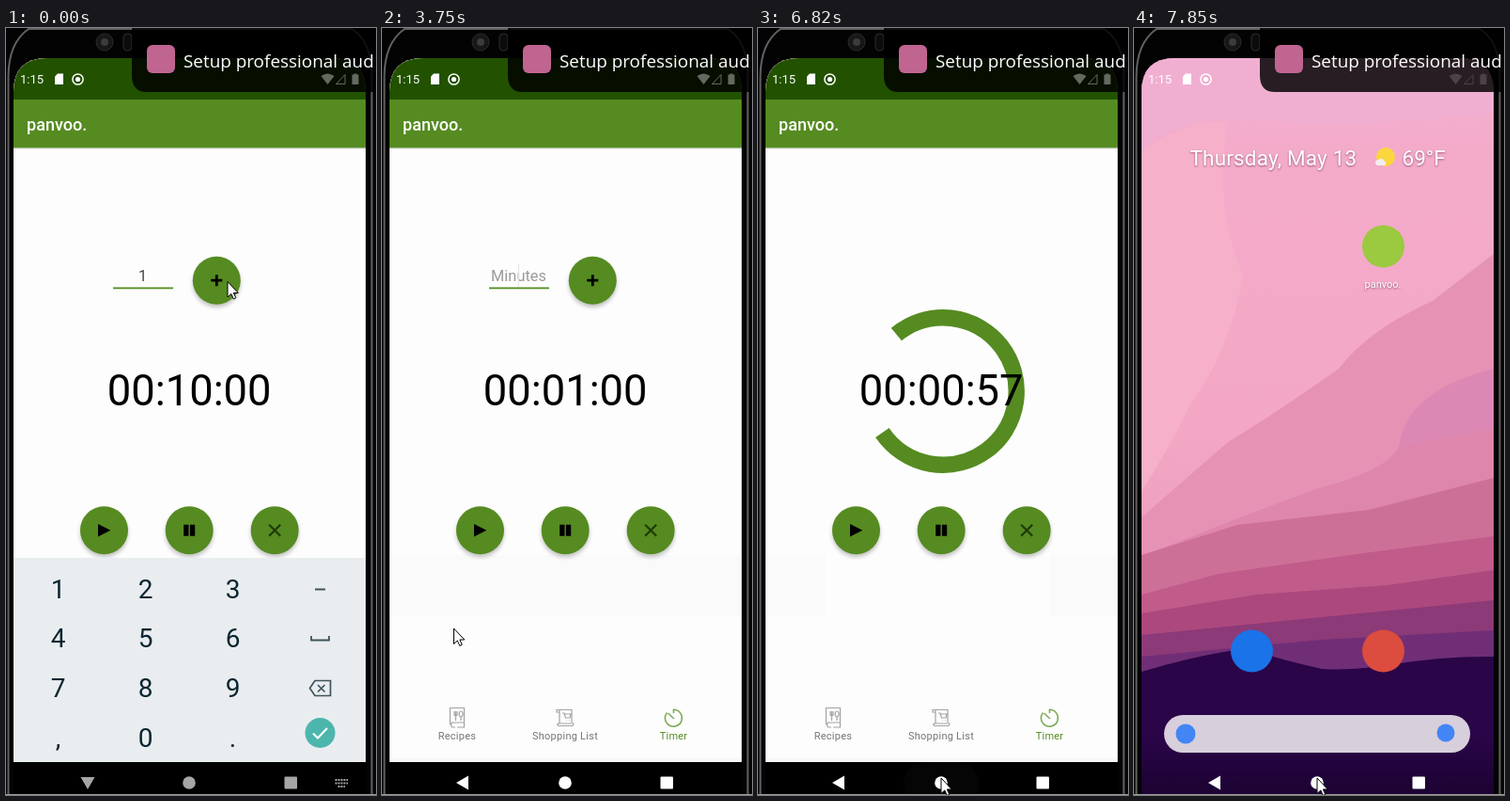
An HTML page for the animation above (8000 ms loop, 394x815 px).

```html
<!DOCTYPE html>
<html lang="en">
<head>
<meta charset="utf-8">
<title>Kitchen timer</title>
<style>
html, body { margin: 0; width: 100%; height: 100%; overflow: hidden; background: #000; }
svg { display: block; width: 394px; height: 815px; font-family: Roboto, sans-serif; }
.mid { text-anchor: middle; }
.fab { filter: drop-shadow(0 3px 2px rgba(0, 0, 0, .24)); }
.fab.down { filter: drop-shadow(0 5px 3px rgba(0, 0, 0, .32)); }
.wash { fill: #fff; opacity: 0; }
.down .wash { opacity: .14; }
.glow { filter: drop-shadow(0 1px 1px rgba(60, 0, 40, .5)); }
.line { fill: none; stroke-width: 1.2; }
</style>
</head>
<body>
<svg viewBox="0 0 394 815">
  <defs>
    <clipPath id="screen"><path d="M8 815V68Q8 32 44 32H347Q383 32 383 68V815Z"/></clipPath>
    <linearGradient id="sky" x1="0" y1="0" x2="0" y2="1">
      <stop offset="0" stop-color="#f0b1d3"/><stop offset=".12" stop-color="#f4abca"/>
      <stop offset=".5" stop-color="#f3a7c4"/><stop offset="1" stop-color="#e592b4"/>
    </linearGradient>
    <linearGradient id="night" x1="0" y1="0" x2="0" y2="1">
      <stop offset=".6" stop-color="#2a0548"/><stop offset="1" stop-color="#1c0232"/>
    </linearGradient>
  </defs>

  <rect width="394" height="815" fill="#030303"/>
  <path d="M2.500 815V52Q2.500 16 24 1H368Q389.500 14 389.500 50V815" fill="none" stroke="#626262" stroke-width="2"/>
  <circle cx="105" cy="15" r="9" fill="#171717" stroke="#2c2c2c"/>
  <circle cx="105" cy="15" r="4" fill="#3b3b3f"/>
  <rect x="125" y="6" width="9" height="18" rx="4" fill="#0c0c0c" stroke="#2c2c2c"/>

  <g clip-path="url(#screen)">
    <g id="home">
      <rect x="8" y="32" width="375" height="783" fill="url(#sky)"/>
      <path d="M8 32H383V90Q230 108 100 96Q40 100 8 130Z" fill="#f0afd1"/>
      <path d="M8 130Q60 96 100 100Q84 190 116 262Q104 340 60 400Q36 450 8 492Z" fill="#f7b0ca"/>
      <path d="M383 240L318 290Q250 320 218 362Q150 410 100 440L8 520V690H383Z" fill="#e692b5"/>
      <path d="M383 362Q290 385 282 445L383 425Z" fill="#db88b4"/>
      <path d="M383 425L282 445Q270 470 200 488Q110 520 8 562V690H383Z" fill="#dd82aa" opacity=".75"/>
      <path d="M383 478L250 512L110 528L8 560V700H383Z" fill="#cd7098"/>
      <path d="M383 540L230 560L90 580L8 602V700H383Z" fill="#c15c8a"/>
      <path d="M383 576L270 592L130 602L8 622V700H383Z" fill="#ad487e"/>
      <path d="M383 608L240 622L8 645V700H383Z" fill="#8c3a78"/>
      <path d="M383 640L200 650L8 668V700H383Z" fill="#702e76"/>
      <path d="M8 684Q55 670 95 663Q108 660 128 662Q160 672 200 681Q235 683 270 677Q330 667 383 668V815H8Z" fill="url(#night)"/>
      <g id="launcher">
        <g class="glow" fill="#fff" font-size="22.5">
          <text x="59.500" y="146" letter-spacing=".18">Thursday, May 13</text>
          <text x="285.500" y="146">69°F</text>
        </g>
        <circle cx="268" cy="137" r="10" fill="#fbd63c"/>
        <path d="M260 146a3 3 0 0 1 .3-6a3.800 3.800 0 0 1 6.500 1.800a2.200 2.200 0 0 1 0 4.200Z" fill="#f1edf0"/>
        <circle cx="265.500" cy="232" r="22.500" fill="#9bc93f"/>
        <text class="mid glow" x="265" y="276" font-size="11" fill="#fff">panvoo.</text>
        <circle cx="125.500" cy="662" r="22.500" fill="#1a73e8"/>
        <circle cx="265.500" cy="662" r="22.500" fill="#dc4c3f"/>
        <rect x="32" y="730" width="326" height="40" rx="20" fill="#d8cfdc"/>
        <circle cx="55" cy="750" r="10.500" fill="#4285f4"/>
        <circle cx="332" cy="749" r="9.500" fill="#4285f4"/>
      </g>
    </g>

    <g id="app">
      <rect x="8" y="32" width="375" height="783" fill="#fdfdfd"/>
      <rect x="8" y="127" width="375" height="1.300" fill="#b4bda8"/>
      <rect x="8" y="32" width="375" height="45" fill="#225100"/>
      <rect x="8" y="76" width="375" height="51" fill="#558b21"/>
      <text x="22" y="109" font-size="18" font-weight="500" fill="#fff">panvoo.</text>
      <g id="shade" fill="#fafafa">
        <rect x="8" y="560" width="64" height="65"/>
        <rect x="311" y="560" width="72" height="65"/>
        <rect id="shadeMid" x="72" y="560" width="239" height="65"/>
      </g>
      <g id="entry">
        <text id="minutes" class="mid" x="145.500" y="269" font-size="16.400"></text>
        <path id="caret" d="M145.500 251V275" stroke="#e2e2e2"/>
        <rect x="114" y="275.500" width="64" height="1.800" fill="#558b21"/>
        <g id="plus"></g>
      </g>
      <path id="ring" fill="none" stroke="#558b21" stroke-width="17.500"/>
      <text id="clock" class="mid" x="195.200" y="400.500" font-size="45.300"></text>
      <g id="play"></g><g id="pause"></g><g id="stop"></g>

      <g font-size="11" letter-spacing=".25" class="mid" fill="#757575">
        <text x="80" y="756">Recipes</text>
        <text x="195" y="756">Shopping List</text>
        <text x="310.500" y="756" fill="#558b21">Timer</text>
      </g>
      <g class="line" stroke="#a3a3a3">
        <path d="M72.500 740V722.500H87.500V738H74.500Q72 741 75 743H78M80 743H87.500V738M77 726V730Q78.500 732 80 730V726M78.500 726V736M84 736V732M84 726a2 3 0 1 0 .1 0"/>
        <path d="M189 739V724.500H186V727H189M189 724.500H202V738M187 739H204Q204 742 201 741.500H189Q186 741 187 739M192 728H194L195.500 733H200L201 729H194.500M196 735.500h.5M199.500 735.500h.5"/>
      </g>
      <path d="M310.500 728V724.200A9 9 0 1 1 303.500 727.500M304.500 728L311 734" class="line" stroke="#7dab55" style="stroke-width:1.600"/>
      <rect x="8" y="776" width="375" height="4" fill="#f8f8f8"/>

      <g id="keys">
        <rect x="8" y="563" width="375" height="217" fill="#e9edf0"/>
        <g id="digits" class="mid" font-size="28" fill="#0b2630"></g>
        <path d="M329 596.500H340M325 646V650.500H344V646" fill="none" stroke="#3f545c" stroke-width="1.800"/>
        <path d="M329 693.500H345.500V709.500H329L323.500 701.500ZM332 698L339.500 705.500M339.500 698L332 705.500" fill="none" stroke="#3f545c" stroke-width="1.700"/>
        <circle cx="334.500" cy="749" r="16" fill="#4db6ac"/>
        <path d="M327 749.500L332 754.500L342 744" fill="none" stroke="#fff" stroke-width="2"/>
      </g>
      <rect x="8" y="780" width="375" height="50" fill="#000"/>
    </g>

    <rect id="backTap" x="71" y="780" width="32" height="44" rx="15" fill="#242424"/>
    <rect id="homeTap" x="155.500" y="780" width="79.500" height="46" rx="21" fill="#262626"/>
    <g id="nav" fill="#fff">
      <path id="back" d="M79 802L92 794.500V809.500Z"/>
      <circle cx="195" cy="802" r="6.800"/>
      <rect x="296.500" y="795.500" width="13.500" height="13" rx="1"/>
      <path id="switch" d="M350.500 799H364M350.500 802.500H364M353.500 806H361" stroke="#fff" stroke-width="2" stroke-dasharray="2 1"/>
    </g>
  </g>

  <path d="M134 0H394V68H150Q134 68 134 50Z" fill="#000" opacity=".83"/>
  <rect x="150" y="18" width="30" height="30" rx="6" fill="#bf6590"/>
  <text x="189" y="42" font-size="18.900" fill="#fff" style="font-family:'Open Sans',sans-serif">Setup professional aud</text>

  <g fill="#fff">
    <text x="15" y="59" font-size="13">1:15</text>
    <path d="M52 51.500L55 48.500H61V60H52Z"/>
    <circle cx="76.500" cy="54.500" r="5.600" fill="none" stroke="#fff" stroke-width="1.500"/>
    <circle cx="76.500" cy="54.500" r="2.600"/>
    <g id="signal">
      <path d="M335.500 51Q342.500 46 349.500 51L342.500 60Z"/>
      <path d="M361 49.500V59.500H351.500Z" fill="none" stroke="#fff"/>
      <path d="M368.500 49.500H370.500V48.500H373.500V49.500H375.500V60H368.500Z"/>
    </g>
  </g>
  <rect y="814" width="394" height="1" fill="#9a9a9a"/>
  <path id="mouse" d="M0 0V16.500L3.800 13L6.300 18.500L8.800 17.300L6.300 12H11.300Z" fill="#fff" stroke="#000"/>
</svg>

<script>
const LOOP = 8000;
const TICK = 130;      // the screen refreshes at this pace
const ADD = 500, HIDE_KEYS = 2500, PLAY = 4400, SPIN = 4670, LEAVE = 7400;

// Mouse moves: start, end, and the point reached.
const MOVES = [
  [1170, 1560, 134.5, 498],
  [1560, 2210, 85.5, 794],
  [3640, 3770, 76.5, 638],
  [3770, 4160, 95.5, 551],
  [5200, 5850, 195, 797]
];

const $ = id => document.getElementById(id);
const set = (id, name, value) => $(id).setAttribute(name, value);
const show = (id, on) => { $(id).style.display = on ? '' : 'none'; };
const within = (t, a, b) => t >= a && t < b;

// Smooth step from 0 at time a to 1 at time b.
function ramp(t, a, b) {
  const u = Math.min(1, Math.max(0, (t - a) / (b - a)));
  return u * u * (3 - 2 * u);
}
const pulse = (t, a, top, b) => ramp(t, a, top) - ramp(t, top, b);

function fab(id, x, y, icon) {
  set(id, 'transform', `translate(${x} ${y})`);
  $(id).innerHTML = `<g class="fab"><circle r="25.500" fill="#558b21"/><circle class="wash" r="25.500"/></g>${icon}`;
}
fab('plus', 224.3, 268.2, '<path d="M-6 0H6M0-6V6" stroke="#000" stroke-width="2.800"/>');
fab('play', 104.5, 533.8, '<path d="M-6.500-6.800L6.800 0L-6.500 6.800Z"/>');
fab('pause', 195.2, 533.8, '<path d="M-6-6H-.7V6H-6ZM.7-6H6V6H.7Z"/>');
fab('stop', 286.2, 533.8, '<path d="M-6-6L6 6M6-6L-6 6" stroke="#203a06" stroke-width="2.200"/>');

$('digits').innerHTML = [...'123456789,0.'].map((c, i) =>
  `<text x="${55.5 + i % 3 * 93}" y="${605.5 + Math.floor(i / 3) * 52.7}">${c}</text>`).join('');

function moveMouse(t) {
  let x = 236, y = 269.5;
  for (const [a, b, toX, toY] of MOVES) {
    const k = ramp(t, a, b);
    x += (toX - x) * k;
    y += (toY - y) * k;
  }
  set('mouse', 'transform', `translate(${x} ${y})`);
}

function clockText(t) {
  const s = t < ADD ? 600 : t < PLAY ? 60 : 59 - Math.floor((t - PLAY) / 980);
  const two = n => String(n).padStart(2, '0');
  return `00:${two(Math.floor(s / 60))}:${two(s % 60)}`;
}

// Steep S-curve over the first half of a cycle, then rest at 1.
function rush(x) {
  const u = Math.min(1, Math.max(0, x * 2));
  const a = 8 * u ** 2.3, b = (1 - u) ** 2.3;
  return a / (a + b);
}

function drawRing(t) {
  const hung = within(t, 6370, 6800) ? 6370 : t;   // the dial stalls for a moment
  const turns = (hung - SPIN) / 1267, p = turns % 1;
  const spin = -90 + 216 * turns + 90 * p;
  const from = spin + 270 * rush(p - .5), to = spin + 270 * rush(p) + 10.8;
  const at = deg => {
    const a = deg * Math.PI / 180;
    return `${197 + 78.2 * Math.cos(a)} ${386 + 78.2 * Math.sin(a)}`;
  };
  set('ring', 'd', `M${at(from)}A78.2 78.2 0 ${to - from > 180 ? 1 : 0} 1 ${at(to)}`);
}

function draw(t) {
  const typing = t < HIDE_KEYS + 200, hint = t >= ADD;
  const running = t >= PLAY, spinning = t >= SPIN, atHome = t >= LEAVE;
  moveMouse(t);

  show('app', !atHome);
  set('app', 'transform', `translate(0 ${Math.round(14 * ramp(t, 7060, 7280))})`);
  show('entry', !running);
  show('caret', hint);
  $('minutes').textContent = hint ? 'Minutes' : '1';
  set('minutes', 'fill', hint ? '#9b9b9b' : '#444');
  $('clock').textContent = clockText(t);
  $('plus').firstChild.classList.toggle('down', within(t, 380, 750));
  $('play').firstChild.classList.toggle('down', within(t, PLAY, PLAY + 500));

  set('keys', 'transform', `translate(0 ${230 * ramp(t, HIDE_KEYS, HIDE_KEYS + 400)})`);
  show('shade', within(t, HIDE_KEYS + 400, 7060));
  show('shadeMid', !running);

  show('ring', spinning);
  if (spinning) drawRing(t);

  const dim = 1 - ramp(t, HIDE_KEYS, HIDE_KEYS + 250) + ramp(t, 4950, 5500) - ramp(t, 6120, 6370);
  set('nav', 'opacity', 1 - .35 * dim);
  show('switch', typing);
  set('back', 'transform', typing ? 'rotate(-90 86.500 801.500)' : '');
  set('backTap', 'opacity', pulse(t, 2100, HIDE_KEYS - 30, 2870));
  set('homeTap', 'opacity', pulse(t, 5850, 6110, 6950));
  set('signal', 'opacity', atHome ? .16 : .38);

  const arrive = ramp(t, 7280, 7800);
  set('launcher', 'opacity', arrive);
  set('launcher', 'transform', `translate(195 430) scale(${.94 + .06 * arrive}) translate(-195 -430)`);
}

const start = performance.now();
function frame() {
  const t = (performance.now() - start) % LOOP;
  draw(Math.floor((t + 25) / TICK) * TICK);
  requestAnimationFrame(frame);
}
frame();
</script>
</body>
</html>
```
